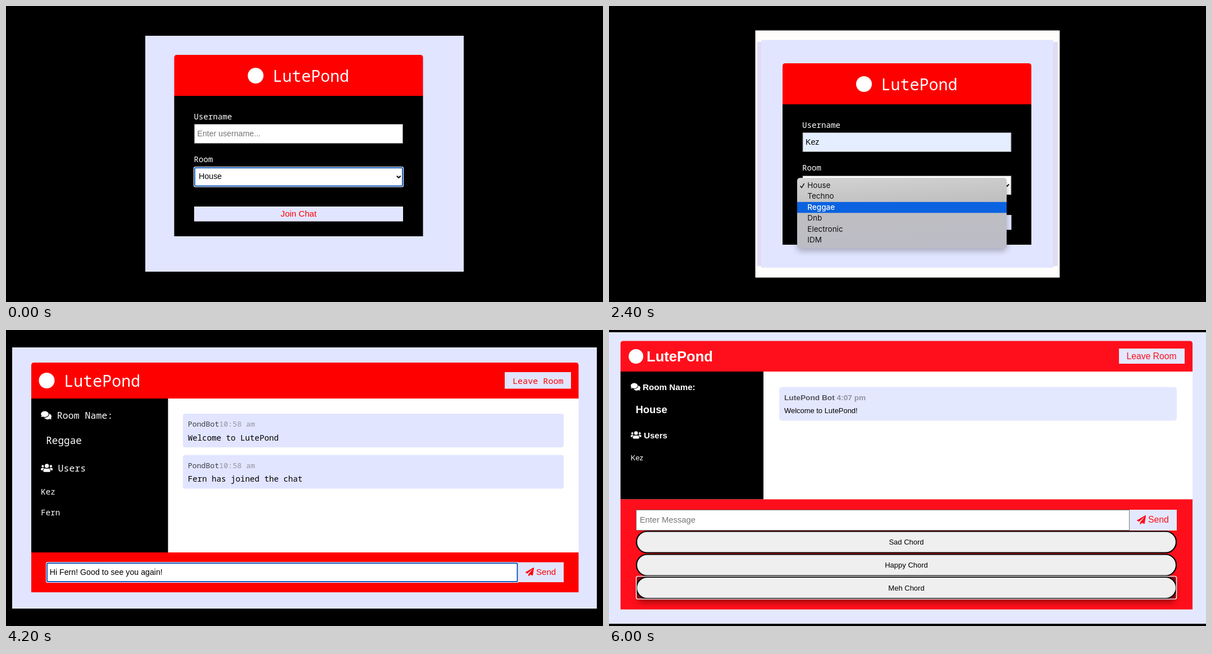
Recreate the animation shown at these times as an HTML page. Size 1063 by 527 pixels, loop 6.6 s.

```html
<!DOCTYPE html>
<html lang="en">
<head>
<meta charset="utf-8">
<title>LutePond</title>
<style>
  html, body { margin: 0; width: 100%; height: 100%; overflow: hidden; background: #000; }
  svg { display: block; width: 1063px; height: 527px; }
  text { white-space: pre; }
  .mono { font-family: "Noto Sans Mono", monospace; }
  .sans { font-family: "Liberation Sans", Arial, sans-serif; }
  .menu { font-family: Inter, sans-serif; }
</style>
</head>
<body>
<svg id="stage" viewBox="0 0 1063 527">
  <defs>
    <linearGradient id="menuFill" x1="0" y1="0" x2="0.15" y2="1">
      <stop offset="0" stop-color="#d3d3d3"/>
      <stop offset="0.45" stop-color="#bfbfc0"/>
      <stop offset="1" stop-color="#bcbcc6"/>
    </linearGradient>
    <filter id="soft" x="-10%" y="-30%" width="120%" height="170%">
      <feGaussianBlur stdDeviation="6"/>
    </filter>
    <g id="comments">
      <path d="M208 32C93 32 0 104 0 192c0 34 14 66 38 92-13 30-36 54-36 54-5 6-2 14 6 14 37 0 67-12 89-25 32 16 70 25 111 25 115 0 208-72 208-160S323 32 208 32z"/>
      <path d="M538 412c24-26 38-58 38-92 0-67-53-124-129-148 1 7 1 13 1 20 0 106-108 192-240 192-11 0-21-1-32-2 32 58 106 98 192 98 41 0 79-9 111-25 22 13 52 25 89 25 8 0 11-8 6-14 0 0-23-24-36-54z"/>
    </g>
    <g id="users">
      <circle cx="96" cy="160" r="64"/>
      <circle cx="544" cy="160" r="64"/>
      <circle cx="320" cy="144" r="112"/>
      <path d="M173 275c-12-12-28-19-45-19H64c-35 0-64 29-64 64v32c0 18 14 32 32 32h66c6-47 35-87 75-109z"/>
      <path d="M467 275c12-12 28-19 45-19h64c35 0 64 29 64 64v32c0 18-14 32-32 32h-66c-6-47-35-87-75-109z"/>
      <path d="M397 288h-8c-43 21-95 21-138 0h-8c-64 0-115 52-115 115v29c0 27 21 48 48 48h288c27 0 48-21 48-48v-29c0-63-51-115-115-115z"/>
    </g>
    <path id="plane" d="M476 3 12 271c-18 10-15 35 3 43l106 44 287-253c6-5 14 3 9 9L176 407v81c0 23 28 32 42 15l64-77 125 52c14 6 30-3 33-18l72-432c3-20-19-35-36-25z"/>
  </defs>
</svg>
<script>
const APP = 'LutePond', ME = 'Kez', PAL = 'Fern', BOT = 'PondBot';
const LAV = '#e1e5ff', RED = '#ff0000', GREY = '#757575', BLUE = '#1257b8';
const STEP = 600;

const rect = (x, y, w, h, fill, more = '') =>
  `<rect x="${x}" y="${y}" width="${w}" height="${h}" fill="${fill}" ${more}/>`;
const text = (x, y, size, str, fill, font = 'mono', more = '') =>
  `<text x="${x}" y="${y}" font-size="${size}" fill="${fill}" class="${font}" ${more}>${str}</text>`;
const icon = (id, x, y, w, box, fill) =>
  `<use href="#${id}" fill="${fill}" transform="translate(${x} ${y}) scale(${w / box})"/>`;
const dot = (x, y, r) => `<circle cx="${x}" cy="${y}" r="${r}" fill="#fff"/>`;
const capRect = (x, y, w, h, r, fill) =>
  `<path d="M${x} ${y + h}v${r - h}q0 ${-r} ${r} ${-r}h${w - 2 * r}q${r} 0 ${r} ${r}v${h - r}z" fill="${fill}"/>`;
const box = (x0, y0, x1, y1, fill = LAV) => rect(x0, y0, x1 - x0, y1 - y0, fill);
const at = (x, y, body) => `<g transform="translate(${x} ${y})">${body}</g>`;
const MID = 'text-anchor="middle"', BOLD = 'font-weight="700"', LIGHT = 'font-weight="300"';

function field(x, y, w, h, fill, focus) {
  return focus
    ? rect(x - 1, y - 1, w + 2, h + 2, '#fff', 'rx="3"') +
      rect(x + 1, y + 1, w - 2, h - 2, fill, `rx="1.5" stroke="${BLUE}" stroke-width="2"`)
    : rect(x + .5, y + .5, w - 1, h - 1, fill, 'stroke="#767676"');
}

function menu(pick) {
  const rooms = ['House', 'Techno', 'Reggae', 'Dnb', 'Electronic', 'IDM'], row = 19.45;
  let s = rect(26, 212, 373, 122, '#000', 'rx="6" opacity=".28" filter="url(#soft)"') +
    rect(26, 204, 373, 125.5, 'url(#menuFill)', 'rx="5"') +
    rect(26, 208 + pick * row, 373, row, pick ? '#0b62e0' : '#1a6ff0');
  rooms.forEach((room, i) => {
    const on = i === pick;
    s += text(44.3, 221.7 + i * row, 13.5, room, on ? '#fff' : '#111', 'menu', on ? 'font-weight="500"' : '');
  });
  return s + `<path d="M31.5 218.2l2.6 3.2 4.6-7.6" fill="none" stroke="${pick ? '#111' : '#fff'}" stroke-width="1.5"/>`;
}

function login(x, y, { user, room = 'House', focus, pick }) {
  return at(x, y,
    capRect(0, 0, 443, 74, 5, RED) + rect(0, 73, 443, 250, '#000') +
    dot(145, 37, 14) + text(175.5, 48, 28.35, APP, '#fff') +
    text(35, 115, 14.2, 'Username', '#fff') +
    field(35.5, 123, 372, 35, user ? '#e5eeff' : '#fff') +
    text(41, 145, 14.2, user || 'Enter username...', user ? '#000' : GREY, 'sans') +
    text(35, 191, 14.2, 'Room', '#fff') +
    field(35.5, 200, 372, 34.5, '#fff', focus) +
    text(43.7, 221.3, 14.2, room, '#000', 'sans') +
    '<path d="M396.3 215.5l3.4 3.5 3.4-3.5" fill="none" stroke="#000" stroke-width="1.9"/>' +
    rect(35.5, 270, 372, 26.5, LAV) +
    text(221.5, 287.7, 15.1, 'Join Chat', RED, 'sans', MID) +
    (pick === undefined ? '' : menu(pick)));
}

function bubble(i, [who, time, body]) {
  return at(270, 91 + i * 73.6,
    rect(0, 0, 678, 60, LAV, 'rx="4"') +
    text(8.7, 23, 13.3, `${who}<tspan fill="#93959f">${time}</tspan>`, '#3d3e45', 'mono', LIGHT) +
    text(8.7, 47.7, 14.2, body, '#000'));
}

function chat(x, y, h, { users, posts, focus, draft }) {
  const foot = 64 + h;
  return at(x, y,
    capRect(0, 0, 974.5, 65, 5, RED) +
    rect(0, 64, 244, h, '#000') + rect(243.5, 64, 731, h, '#fff') +
    rect(0, foot, 974.5, 71, RED) +
    dot(27.5, 32, 14) + text(58.3, 43, 28.35, APP, '#fff') +
    rect(843, 17, 118, 29.5, LAV) + text(857, 38, 15.1, 'Leave Room', RED, 'mono', LIGHT) +
    icon('comments', 17.3, 85.5, 18.8, 576, '#fff') + text(45.8, 100, 16.6, 'Room Name:', '#fff') +
    text(26.2, 145, 17.7, 'Reggae', '#fff') +
    icon('users', 17.3, 179.2, 20.8, 640, '#fff') + text(47.5, 194, 16.6, 'Users', '#fff') +
    users.map((u, i) => text(17.3, 235 + i * 36.5, 14.2, u, '#fff')).join('') +
    posts.map((p, i) => bubble(i, p)).join('') +
    rect(866, foot + 17.5, 82, 35.5, LAV) +
    field(27, foot + 18, 839.5, 35, '#fff', focus) +
    text(32.7, foot + 40, 14.2, draft || 'Enter Message', draft ? '#000' : GREY, 'sans') +
    icon('plane', 880, foot + 27, 15.1, 512, RED) +
    text(899, foot + 40, 15.1, 'Send', RED, 'sans'));
}

function chords() {
  const red = '#ff0f1b', lav = '#e4e8ff';
  const pill = (y, label) =>
    rect(49, y + 1, 961, 38, '#efefef', 'rx="19" stroke="#000" stroke-width="2.2"') +
    text(529.5, y + 24.8, 13, label, '#000', 'sans', MID);
  return box(0, 4, 1063, 523, lav) +
    capRect(20.5, 19.5, 1018.5, 55, 5, red) +
    box(20.5, 74, 275, 301.5, '#000') + box(275, 74, 1039, 301.5, '#fff') +
    box(20.5, 301.5, 1039, 497.5, red) +
    dot(48, 47, 13) + text(67, 56, 25.6, APP, '#fff', 'sans', BOLD) +
    box(908, 33, 1025, 60, lav) + text(921.5, 52, 15.7, 'Leave Room', red, 'sans') +
    icon('comments', 38.7, 93.5, 17.2, 576, '#fff') + text(60, 106.5, 15.2, 'Room Name:', '#fff', 'sans', BOLD) +
    text(47.5, 148, 18.4, 'House', '#fff', 'sans', BOLD) +
    icon('users', 38.7, 179.3, 18.8, 640, '#fff') + text(62, 192.5, 15.1, 'Users', '#fff', 'sans', BOLD) +
    text(38.5, 232, 13.1, ME, '#fff', 'sans') +
    rect(303, 101.5, 708, 60, lav, 'rx="5"') +
    text(312, 125, 13.7, `${APP} Bot <tspan fill="#92949c">4:07 pm</tspan>`, '#54565e', 'sans', BOLD) +
    text(312, 148, 12.95, `Welcome to ${APP}!`, '#000', 'sans') +
    box(926, 320, 1011, 357, lav) + field(48, 320, 879, 37, '#fff') +
    text(54.7, 343.3, 14.75, 'Enter Message', GREY, 'sans') +
    icon('plane', 940, 330, 16, 512, red) + text(960, 343.3, 15.8, 'Send', red, 'sans') +
    pill(357.5, 'Sad Chord') + pill(398.5, 'Happy Chord') +
    rect(52, 448, 956, 36, '#400', 'rx="6" opacity=".6" filter="url(#soft)"') +
    rect(48.5, 438.5, 962, 40.5, '#8a0a10', 'rx="3"') +
    pill(439, 'Meh Chord') +
    rect(48.5, 438.5, 962, 40.5, 'none', 'rx="3" stroke="#e9e3e6" stroke-width="1.7"');
}

const posts = [
  [BOT, '10:58 am', `Welcome to ${APP}`],
  [BOT, '10:58 am', `${PAL} has joined the chat`],
  [ME, '10:59 am', `Hi ${PAL}! Good to see you again!`],
  [BOT + ' ', '10:59 am', `${PAL} has left the chat`]
];
const rim = box(260.5, 43.5, 802.5, 483.5, '#fffdfb');
const strip = box(264, 64, 799, 463, '#e2dbf4');

const scenes = [
  box(248, 53, 815, 473) + login(299.5, 87, { focus: true }),
  box(258, 56, 804, 470) + login(310, 92, { user: ME }),
  box(260.5, 43.5, 802.5, 483.5) + login(310, 92.3, { user: ME, pick: 0 }),
  rim + box(264, 64, 799, 463) + login(309, 102, { user: ME, pick: 1 }),
  rim + strip + box(271, 60.5, 791, 466) + login(309, 102, { user: ME, pick: 2 }),
  rim + box(251, 60, 812, 466) + login(309, 102, { user: ME, room: 'Reggae', focus: true }),
  rim + box(11.5, 45, 1051, 482) + chat(38, 66, 237, { users: [ME], posts: posts.slice(0, 1) }),
  box(11, 31, 1052, 496) + chat(45, 58, 274, {
    users: [ME, PAL], posts: posts.slice(0, 2), focus: true, draft: posts[2][2]
  }),
  box(16, 38, 1047, 488) + chat(52.2, 51, 274, { users: [ME, PAL], posts: posts.slice(0, 3), focus: true }),
  box(14, 0, 1048, 527) + chat(39.8, 17.2, 347.5, { users: [ME], posts, focus: true }),
  chords()
];

const stage = document.getElementById('stage');
const layer = document.createElementNS('http://www.w3.org/2000/svg', 'g');
stage.append(layer);
layer.innerHTML = scenes.map(s => `<g display="none">${s}</g>`).join('');

let shown = -1;
function draw(now) {
  const next = Math.floor(now / STEP) % scenes.length;
  if (next !== shown) {
    [...layer.children].forEach((g, i) => g.setAttribute('display', i === next ? 'inline' : 'none'));
    shown = next;
  }
}
function tick() {
  draw(performance.now());
  requestAnimationFrame(tick);
}
tick();
</script>
</body>
</html>
```
